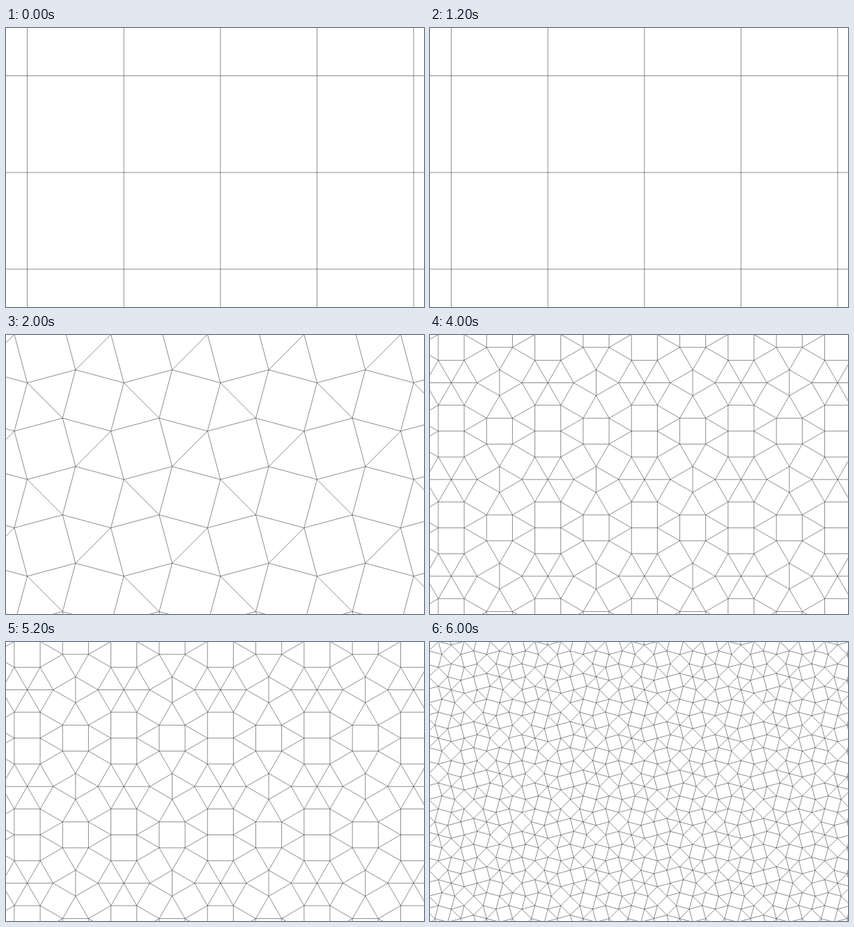
Animation, 600 px wide and 400 px high, one loop 8 s. Source, as an HTML page with a canvas:

```html
<!DOCTYPE html>
<html lang="en">
<head>
<meta charset="utf-8">
<title>Square-triangle tiling inflation</title>
<style>
  html, body { margin: 0; width: 100%; height: 100%; overflow: hidden; background: #fff; }
  canvas { display: block; }
</style>
</head>
<body>
<canvas id="stage" width="600" height="400"></canvas>
<script>
const ctx = document.getElementById('stage').getContext('2d');
const SIDE = 138.65, ORIGIN = [30.5, 68.5], HOLD = 2000;
const RATIO = 2 * Math.cos(Math.PI / 12);   // edge shrinks by this at every step
const edge = step => SIDE / RATIO ** step;

const polar = (r, deg) => [r * Math.cos(deg * Math.PI / 180), r * Math.sin(deg * Math.PI / 180)];
const add = (a, b) => [a[0] + b[0], a[1] + b[1]];
const dist = (a, b) => Math.hypot(a[0] - b[0], a[1] - b[1]);

function unique(points) {
  const kept = [];
  for (const p of points) if (!kept.some(q => dist(p, q) < 1)) kept.push(p);
  return kept;
}

function squareGrid() {
  const points = [];
  for (let j = -1; j < 5; j++)
    for (let i = -1; i < 6; i++) points.push(add(ORIGIN, [i * SIDE, j * SIDE]));
  return points;
}

// Four vertices per cell of the snub square tiling
function snub(points) {
  const s = edge(1), diagonal = polar(s, 45);
  const cell = [[0, 0], polar(s, -15), diagonal, add(diagonal, polar(s, 15))];
  return points.flatMap(p => cell.map(v => add(p, v)));
}

// Every vertex becomes a dodecagon around a hexagon of triangles
function wheels(points, s, turn) {
  const wheel = [[0, 0]];
  for (let k = 0; k < 6; k++) wheel.push(polar(s, turn + 60 * k));
  for (let k = 0; k < 12; k++) wheel.push(polar(s * RATIO, turn + 15 + 30 * k));
  return unique(points.flatMap(p => wheel.map(v => add(p, v))));
}

// Vertices one edge length apart are joined
function join(points, s) {
  return points.flatMap((a, i) =>
    points.slice(i + 1).filter(b => Math.abs(dist(a, b) - s) < 0.5).map(b => [a, b]));
}

const grid = squareGrid(), snubGrid = snub(grid);
const tilings = [
  grid,
  snubGrid,
  wheels(grid, edge(2), 0),
  wheels(snubGrid, edge(3), 15)
].map((points, step) => join(points, edge(step)));

function drawTiling(lines) {
  ctx.fillStyle = '#fff';
  ctx.fillRect(0, 0, 600, 400);
  ctx.strokeStyle = '#000';
  ctx.lineWidth = 0.45;
  for (const [a, b] of lines) {
    ctx.beginPath();
    ctx.moveTo(...a);
    ctx.lineTo(...b);
    ctx.stroke();
  }
}

const start = performance.now();
let shown = -1;
function tick() {
  const step = Math.floor((performance.now() - start) / HOLD) % tilings.length;
  if (step !== shown) drawTiling(tilings[shown = step]);
  requestAnimationFrame(tick);
}
tick();
</script>
</body>
</html>
```
